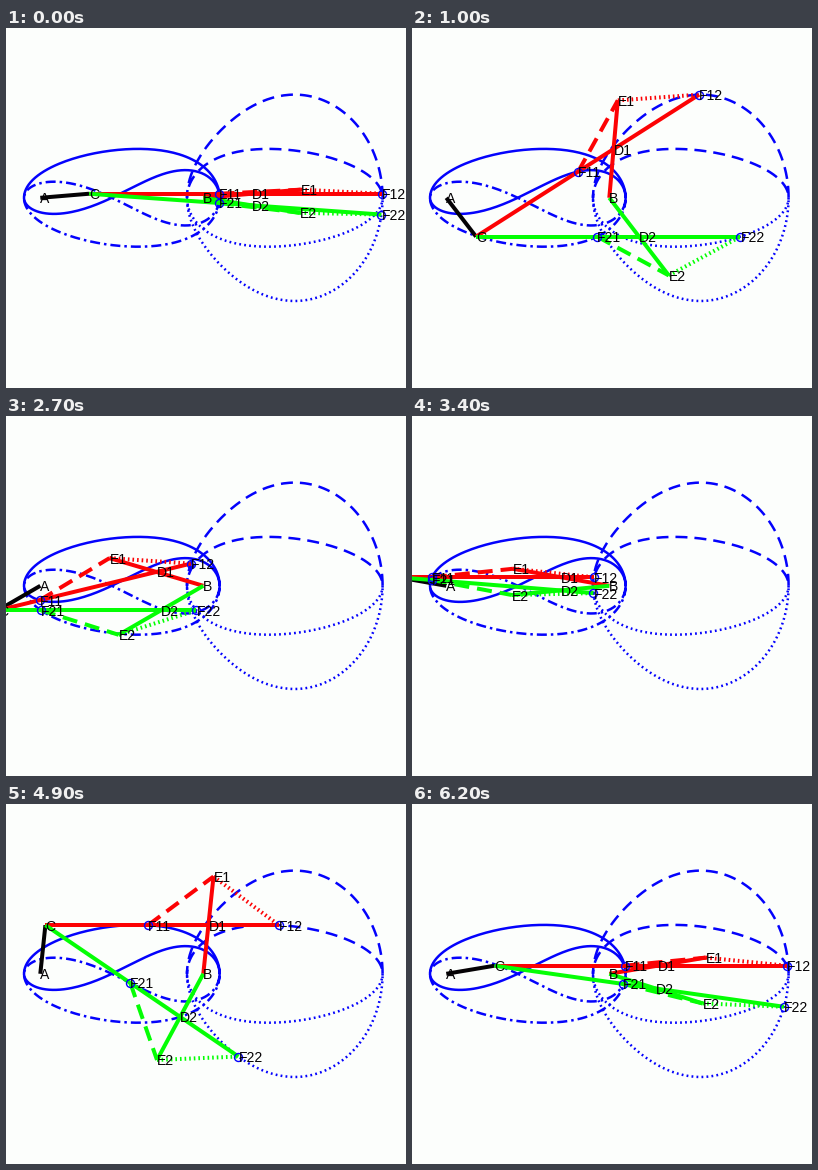
These frames come from a looping animation (400x360 px, 6.3 s). A matplotlib script:

```python
import numpy as np
import matplotlib.pyplot as plt
from matplotlib.animation import FuncAnimation

W, H, DPI = 400, 360, 100
PX = 72 / DPI                      # points per pixel
UNIT = 16.3                        # pixels per mechanism unit
ORIGIN = np.array([34.3, 169.8])   # stage position of pivot A
FRAMES, STEP = 63, 0.1
START = 2 * np.pi - 6.2

BASE, CRANK, ROCKER, ARM = 10, 3, 6, 5
RED, GREEN, BLUE, BLACK = "#fc0204", "#04fe04", "#0402fc", "#040204"

A = np.array([0.0, 0.0])
B = np.array([BASE, 0.0])


def stage(p):
    return ORIGIN + UNIT * np.array([p[0], -p[1]])


def crank_end(theta):
    return CRANK * np.array([np.cos(theta), np.sin(theta)])


def solve(theta, side):
    """Joints D, E and both sliders F; side is +1 above line CB, -1 below."""
    c = crank_end(theta)
    d = np.linalg.norm(B - c)
    u = (B - c) / d
    normal = side * np.array([-u[1], u[0]])
    a = (BASE**2 - CRANK**2 + d**2) / (2 * d)
    joint = c + a * u + np.sqrt(max(BASE**2 - a**2, 0)) * normal
    tip = B + (joint - B) * ROCKER / CRANK
    v = (joint - c) / np.linalg.norm(joint - c)
    foot = c + np.dot(tip - c, v) * v
    half = np.sqrt(max(ARM**2 - np.sum((tip - foot) ** 2), 0))
    return joint, tip, foot - half * v, foot + half * v


fig = plt.figure(figsize=(W / DPI, H / DPI), dpi=DPI, facecolor="#fcfefc")
ax = fig.add_axes([0, 0, 1, 1])
ax.set_xlim(0, W)
ax.set_ylim(H, 0)
ax.axis("off")


def new_line(color, width, dashes=None, z=2):
    line, = ax.plot([], [], color=color, lw=width * PX, zorder=z,
                    solid_capstyle="butt", dash_capstyle="butt")
    if dashes:
        line.set_linestyle((0, tuple(n / width for n in dashes)))
    return line


def join(line, *points):
    line.set_data(*np.array([stage(p) for p in points]).T)


def new_label(text):
    return ax.text(0, 0, text, family="Liberation Sans", fontsize=14 * PX,
                   color=BLACK, ha="left", va="center_baseline", zorder=5)


# Paths traced by the four sliders
sweep = -np.linspace(0, 2 * np.pi, 253)
STYLES = {(1, 2): None, (1, 3): (12, 7),
          (-1, 2): (10, 4, 2.5, 4), (-1, 3): (1.8, 3.2)}
for (side, slot), dashes in STYLES.items():
    path = new_line(BLUE, 2.5, dashes, z=1)
    join(path, *[solve(t, side)[slot] for t in sweep])

crank = new_line(BLACK, 4)
branches = []
for side, color, n in ((1, RED, "1"), (-1, GREEN, "2")):
    bars = [new_line(color, 4), new_line(color, 4),
            new_line(color, 4, (15, 8)), new_line(color, 4, (1.6, 3))]
    names = [new_label(s) for s in ("D" + n, "E" + n, f"F{n}1", f"F{n}2")]
    branches.append((side, bars, names))

rings, = ax.plot([], [], "o", ms=8 * PX, mfc="none", mec=BLUE,
                 mew=1.4 * PX, zorder=4)
new_label("A").set_position(stage(A))
new_label("B").set_position(stage(B))
label_c = new_label("C")


def draw(k):
    theta = START - STEP * k
    c = crank_end(theta)
    join(crank, A, c)
    label_c.set_position(stage(c))
    sliders = []
    for side, (bar, rocker, dashed, dotted), names in branches:
        joints = solve(theta, side)
        _, tip, near, far = joints
        join(bar, c, far)
        join(rocker, B, tip)
        join(dashed, near, tip)
        join(dotted, tip, far)
        for name, p in zip(names, joints):
            name.set_position(stage(p))
        sliders += [near, far]
    join(rings, *sliders)
    return []


anim = FuncAnimation(fig, draw, frames=FRAMES, interval=100,
                     repeat=True, repeat_delay=0)
plt.show()
```
